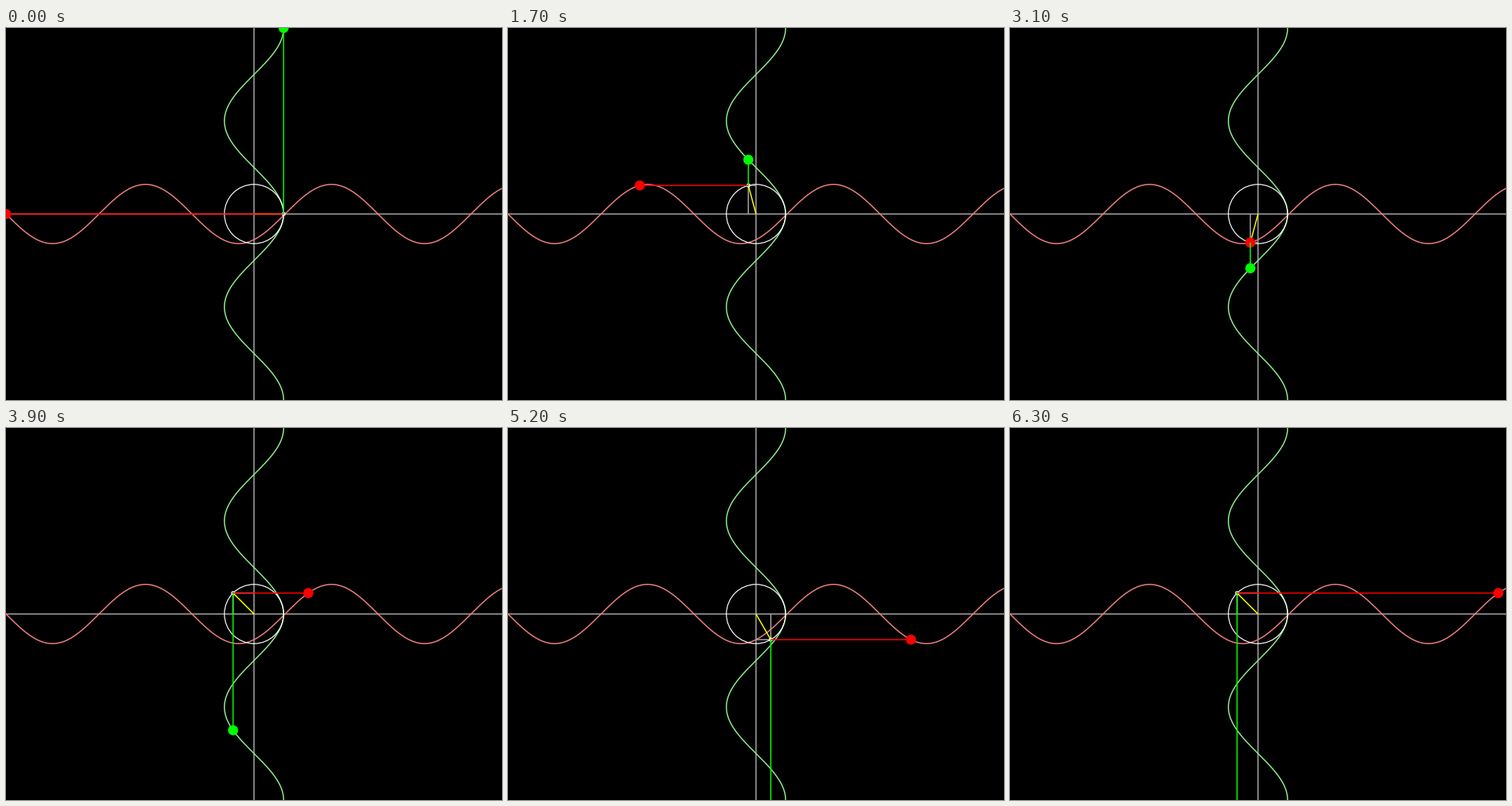
These frames come from a looping animation (640x480 px, 6400 ms). A matplotlib script:

```python
import numpy as np
import matplotlib.pyplot as plt
from matplotlib.animation import FuncAnimation
from matplotlib.patches import Circle

W, H = 640, 480
CX, CY = W / 2, H / 2
PERIOD = 240
R = PERIOD / (2 * np.pi)
FRAMES, INTERVAL, STEP = 64, 100, 10
PX = 0.72  # points per pixel at 100 dpi

fig = plt.figure(figsize=(W / 100, H / 100), dpi=100, facecolor="black")
ax = fig.add_axes([0, 0, 1, 1])
ax.set_xlim(0, W)
ax.set_ylim(H, 0)
ax.axis("off")


def wave_x(s):
    return CX + R * np.cos(s / R)


def wave_y(s):
    return CY + R * np.sin(s / R)


def line(x, y, color, z, width=1.5):
    item, = ax.plot(x, y, color=color, lw=width * PX, zorder=z,
                    solid_capstyle="butt", snap=False)
    return item


def ring(x, y, radius, z):
    return ax.add_patch(Circle((x, y), radius, fill=False, ec="white",
                               lw=1.2 * PX, zorder=z))


def dot(color, z):
    return ax.add_patch(Circle((0, 0), 6.5, fc=color, lw=0, zorder=z))


# Fixed scene
line([0, W], [CY, CY], "darkgray", 1)
line([CX, CX], [0, H], "darkgray", 1)
s = np.linspace(0, W, 1281)
line(s, wave_y(s), "lightcoral", 2)
line(wave_x(s), s, "lightgreen", 2)
ring(CX, CY, R, 3)

# Moving parts, from back to front
drop_x = line([], [], "darkgray", 4)
drop_y = line([], [], "darkgray", 4)
radius_line = line([], [], "yellow", 5)
tip = ring(CX, CY, 2, 6)
red_line = line([], [], "red", 7)
red_dot = dot("red", 8)
green_line = line([], [], "lime", 9)
green_dot = dot("lime", 10)


def update(n):
    s = n * STEP
    x, y = wave_x(s), wave_y(s)
    drop_x.set_data([x, x], [CY, y])
    drop_y.set_data([CX, x], [y, y])
    radius_line.set_data([CX, x], [CY, y])
    tip.center = x, y
    red_line.set_data([x, s], [y, y])
    red_dot.center = s, y
    green_line.set_data([x, x], [y, s])
    green_dot.center = x, s
    return (drop_x, drop_y, radius_line, tip,
            red_line, red_dot, green_line, green_dot)


anim = FuncAnimation(fig, update, frames=FRAMES, interval=INTERVAL,
                     repeat=True, repeat_delay=0)
plt.show()
```
